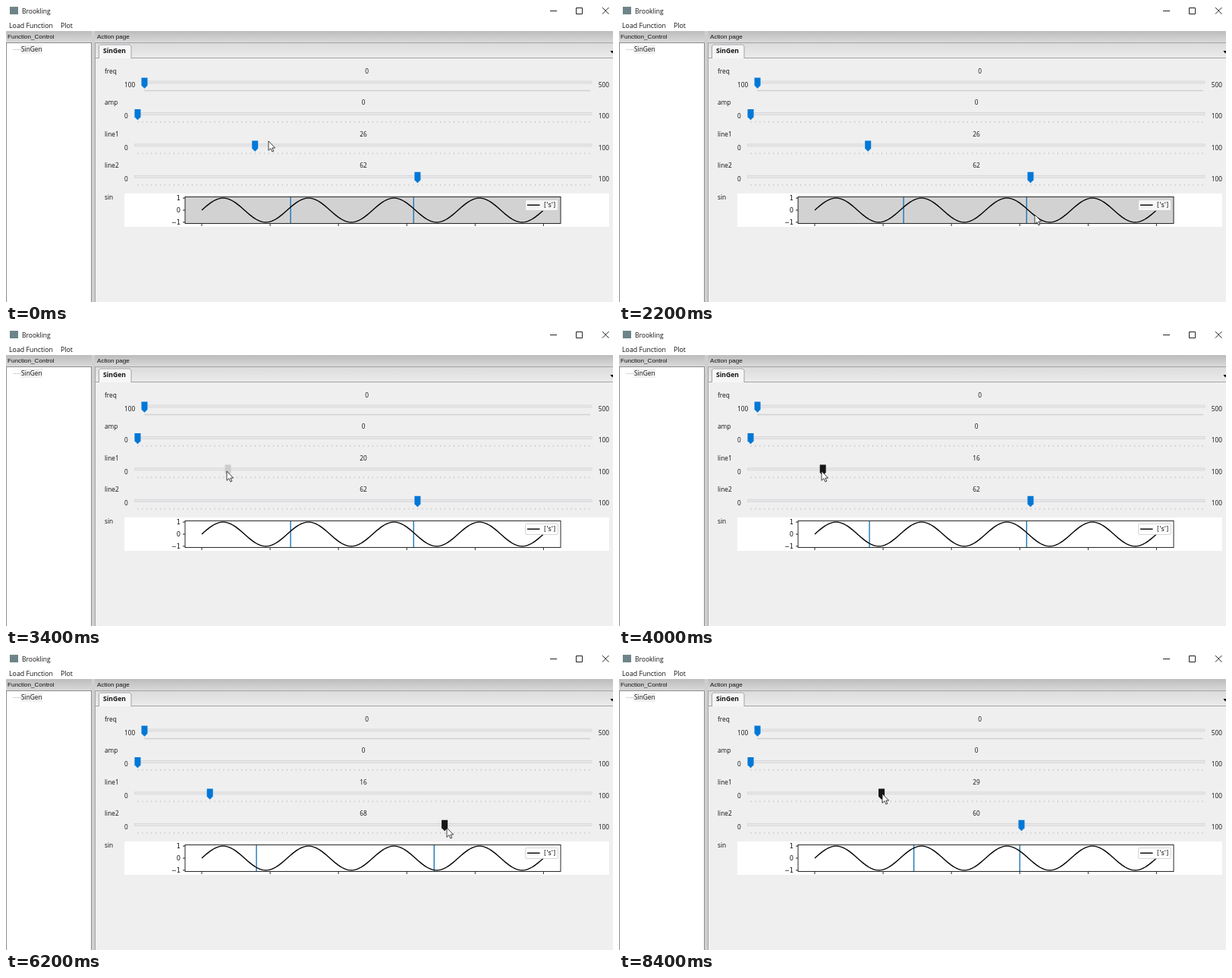
Recreate the animation shown at these times as an HTML page. Size 800 by 390 pixels, loop 8600 ms.

```html
<!DOCTYPE html>
<html lang="en">
<head>
<meta charset="utf-8">
<title>Slider demo</title>
<style>
html, body { margin: 0; width: 100%; height: 100%; overflow: hidden; background: #fff; }
svg { display: block; }
text { font: 8.3px "Open Sans", "Noto Sans", sans-serif; fill: #111; white-space: pre; }
.menu { font-size: 8.8px; }
.dock { font-family: "Liberation Sans", Arial, sans-serif; font-size: 8.1px; }
.tab { font-size: 8.6px; font-weight: 700; }
.plot { font: 8.2px "DejaVu Sans", sans-serif; }
.mid { text-anchor: middle; }
.end { text-anchor: end; }
</style>
</head>
<body>
<svg id="stage" width="800" height="390" viewBox="0 0 800 390">
  <defs>
    <linearGradient id="bar" x2="0" y2="1"><stop stop-color="#bcbcbd"/><stop offset="1" stop-color="#dad9da"/></linearGradient>
    <linearGradient id="tabs" x2="0" y2="1"><stop stop-color="#dcdbdc"/><stop offset="1" stop-color="#ecebec"/></linearGradient>
  </defs>

  <!-- window frame and menu -->
  <rect width="800" height="390" fill="#fff"/>
  <rect x="5" y="1" width="11" height="10" fill="#6d8588"/>
  <text x="21" y="9.5" style="font-size:8.5px">Brookling</text>
  <path d="M717 6.5h9M751.5 2.5h8v8h-8zM786 2l8.5 8.5M794.5 2L786 10.5" fill="none" stroke="#222"/>
  <text class="menu" x="4" y="28.5">Load Function</text>
  <text class="menu" x="72" y="28.5">Plot</text>

  <!-- side panel -->
  <rect y="33" width="118" height="357" fill="#d0cfd0"/>
  <rect y="33" width="113" height="15" fill="url(#bar)"/>
  <text class="dock" x="2" y="43">Function_Control</text>
  <rect x=".5" y="48.5" width="112" height="345" fill="#fff" stroke="#8c8d91"/>
  <rect x="19" y="51" width="29" height="12" fill="#f2f1f2"/>
  <path d="M10 57.5h9" stroke="#aaa" stroke-dasharray="1 1"/>
  <text x="20" y="60">SinGen</text>

  <!-- main page -->
  <rect x="117" y="33" width="683" height="15" fill="url(#bar)"/>
  <text class="dock" x="120" y="43">Action page</text>
  <rect x="118" y="48" width="682" height="342" fill="#f0eff0"/>
  <rect x="118" y="48" width="682" height="20" fill="url(#tabs)"/>
  <path d="M117.5 48V390M117 48.5H800M118 68.5H800" stroke="#a2a2a4"/>
  <path d="M122.5 69V53l2-2H163l2 2V69" fill="#f7f6f7" stroke="#a2a2a4"/>
  <text class="tab" x="128" y="61.5">SinGen</text>
  <path d="M796.5 59h5l-2.5 3.5z"/>

  <g id="rows"></g>

  <!-- plot -->
  <text x="130" y="255">sin</text>
  <rect x="156" y="247" width="639" height="44" fill="#fff"/>
  <rect id="face" x="236" y="251.5" width="495" height="35"/>
  <path id="marks" stroke="#1f77b4" stroke-width="1.4"/>
  <path id="wave" fill="none" stroke="#000" stroke-width="1.4"/>
  <rect x="236" y="251.5" width="495" height="35" fill="none" stroke="#111" stroke-width=".9"/>
  <path id="ticks" stroke="#111" stroke-width=".9"/>
  <text class="plot end" x="230" y="256">1</text>
  <text class="plot end" x="230" y="272">0</text>
  <text class="plot end" x="230" y="288">−1</text>
  <rect x="684.5" y="255.5" width="43" height="14" rx="1.5" fill="#fff" fill-opacity=".8" stroke="#ccc" stroke-width=".8"/>
  <path d="M687 262.3h16.5" stroke="#000" stroke-width="1.4"/>
  <text class="plot" x="709" y="265.2">['s']</text>

  <path id="cursor" d="M0 0V12.3L2.9 9.6L4.9 14L6.8 13.1L4.9 9H8.6Z" fill="#fff" stroke="#111" stroke-width=".8"/>
</svg>
<script>
const LOOP = 8600, STEP = 200;
const BLUE = '#0078d7', HOVER = '#171717', PRESSED = '#cccccc';
const $ = id => document.getElementById(id);
const sliderX = v => 173.5 + 5.95 * v;
const plotX = v => 258 + 4.504 * v;

function add(parent, tag, attrs, text) {
  const el = document.createElementNS('http://www.w3.org/2000/svg', tag);
  for (const k in attrs) el.setAttribute(k, attrs[k]);
  if (text !== undefined) el.textContent = text;
  return parent.appendChild(el);
}

function addSlider(name, i, min, max) {
  const dense = i === 0, left = dense ? 182 : 169;
  const g = add($('rows'), 'g', { transform: `translate(0 ${41.45 * i})` });
  add(g, 'text', { x: 130, y: 89 }, name);
  const value = add(g, 'text', { x: dense ? 475.5 : 471, y: 89, class: 'mid' }, 0);
  add(g, 'text', { x: 156, y: 106.7 }, min);
  add(g, 'text', { x: 795, y: 106.7, class: 'end' }, max);
  add(g, 'rect', { x: left + .5, y: 99, width: 771.5 - left, height: 3, fill: '#e7e6e8', stroke: '#d5d4d6', 'stroke-width': .8 });
  if (dense) add(g, 'path', { d: 'M182 111.5H770', stroke: '#d0cfd1', 'stroke-width': 1.6 });
  else add(g, 'path', { d: 'M173.5 111.3H769.5', stroke: '#bcbbbd', 'stroke-width': 2, 'stroke-dasharray': '.9 5.05' });
  const thumb = add(g, 'path', { d: 'M-4 94.5H4V104.8L0 108.8L-4 104.8Z', fill: BLUE });
  thumb.setAttribute('transform', `translate(${dense ? 182.5 : 173.5})`);
  return (v, color) => {
    value.textContent = v;
    thumb.setAttribute('transform', `translate(${sliderX(v)})`);
    thumb.setAttribute('fill', color);
  };
}

addSlider('freq', 0, 100, 500);
addSlider('amp', 1, 0, 100);
const setLine1 = addSlider('line1', 2, 0, 100);
const setLine2 = addSlider('line2', 3, 0, 100);

let wave = '';
for (let v = 0; v <= 100; v += .5)
  wave += `${v ? 'L' : 'M'}${plotX(v)} ${269 - 15.9 * Math.sin(v * Math.PI / 12.5)}`;
$('wave').setAttribute('d', wave);
$('ticks').setAttribute('d',
  [0, 20, 40, 60, 80, 100].map(v => `M${plotX(v)} 287v3`).join('') +
  [253.1, 269, 284.9].map(y => `M233 ${y}h3`).join(''));

// Key lists hold [time, ...values]
const pointer = [
  [0, 346, 178], [200, 346, 180], [1200, 358, 247], [2200, 548, 275], [2400, 548, 275],
  [3000, 327, 186], [3200, 327, 186], [3400, 291, 186], [3600, 267, 186], [4000, 267, 186],
  [4800, 518, 222], [5000, 545, 229], [5200, 545, 229], [5800, 581, 229], [6400, 581, 229],
  [6800, 533, 229], [7000, 400, 206], [7200, 269, 184], [7400, 269, 184], [8000, 347, 184]
];
const line1 = [[3200, 26], [3400, 20], [3600, 16], [7400, 16], [8000, 29]];
const line2 = [[5200, 62], [5800, 68], [6400, 68], [6800, 60]];

function tween(keys, t) {
  const n = keys.findIndex(k => k[0] > t);
  if (n < 0) return keys[keys.length - 1].slice(1);
  if (n === 0) return keys[0].slice(1);
  const a = keys[n - 1], b = keys[n], p = (t - a[0]) / (b[0] - a[0]);
  return a.slice(1).map((v, i) => v + (b[i + 1] - v) * p);
}

const within = (t, spans) => spans.some(([from, to]) => t >= from && t < to);
const thumbColor = (t, press, hover) => within(t, press) ? PRESSED : within(t, hover) ? HOVER : BLUE;

function draw(now) {
  const t = Math.floor(now % LOOP / STEP) * STEP;
  const [x, y] = tween(pointer, t);
  $('cursor').setAttribute('transform', `translate(${x} ${y})`);
  setLine1(Math.round(tween(line1, t)[0]), thumbColor(t, [[3200, 3800], [7400, 8200]], [[3000, 4200], [7200, LOOP]]));
  setLine2(Math.round(tween(line2, t)[0]), thumbColor(t, [[5200, 6000], [6400, 6800]], [[5000, 7000]]));

  // The plot redraws only when a thumb is released
  const m1 = t < 3800 ? 26 : t < 8200 ? 16 : 29;
  const m2 = t < 6000 ? 62 : t < 6800 ? 68 : 60;
  $('marks').setAttribute('d', [m1, m2].map(v => `M${plotX(v)} 252V286`).join(''));
  $('face').setAttribute('fill', t < 3200 ? '#d3d2d3' : '#fff');
}

const start = performance.now();
function frame() {
  draw(performance.now() - start);
  requestAnimationFrame(frame);
}
frame();
</script>
</body>
</html>
```
